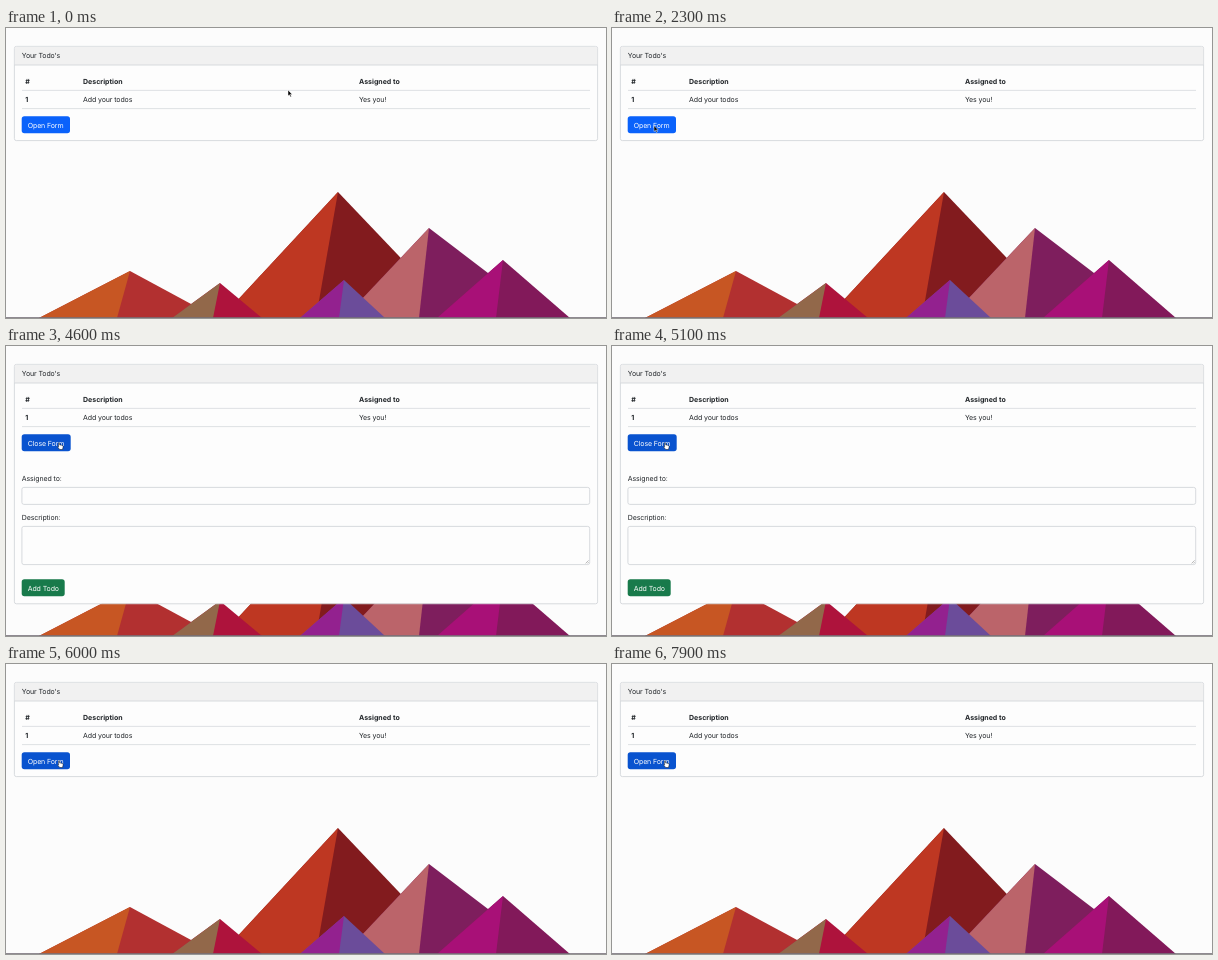
These frames come from a looping animation (600x290 px, 8 s). An HTML page:

```html
<!DOCTYPE html>
<html lang="en">
<head>
<meta charset="utf-8">
<title>Todo list</title>
<style>
  html, body { margin: 0; width: 100%; height: 100%; overflow: hidden; background: #fcfcfc; }
  svg { display: block; width: 600px; height: 290px; }
  text { font: 7px Inter, "Open Sans", sans-serif; letter-spacing: -.1px; fill: #212529; text-rendering: geometricPrecision; }
  .bold { font-weight: 700; letter-spacing: 0; }
  .light { fill: #fff; }
  .box { fill: #fdfdfd; stroke: #cfd2d6; stroke-width: .8; }
  .rule { stroke: #dcdfe2; stroke-width: .9; }
</style>
</head>
<body>
<svg viewBox="0 0 600 290">
  <g id="mountains"></g>
  <path d="M0 289.6H600" stroke="#77717a" stroke-width=".9"/>

  <rect id="card" class="box" x="8.4" y="18.4" width="583.2" rx="2"/>
  <path d="M8.8 37V20.4a1.6 1.6 0 0 1 1.6-1.6H589.6a1.6 1.6 0 0 1 1.6 1.6V37Z" fill="#f1f1f1"/>
  <path d="M8.4 37H591.6" stroke="#cfd2d6" stroke-width=".8"/>
  <text x="15.8" y="30.3">Your Todo's</text>

  <g class="bold">
    <text class="bold" x="19.3" y="55.8">#</text>
    <text class="bold" x="77" y="55.8">Description</text>
    <text class="bold" x="353" y="55.8">Assigned to</text>
    <text class="bold" x="19.3" y="74.4">1</text>
  </g>
  <text x="77" y="74.4">Add your todos</text>
  <text x="353" y="74.4">Yes you!</text>
  <path class="rule" d="M16 62.4H584M16 80.6H584"/>

  <rect id="toggle" x="15.7" y="88.3" height="17" rx="2.7"/>
  <text id="label" class="light" x="21.7" y="99.6"></text>

  <g id="form">
    <text x="15.8" y="135">Assigned to:</text>
    <rect class="box" x="15.9" y="141.4" width="567.8" height="17" rx="2"/>
    <text x="15.8" y="173.6">Description:</text>
    <rect class="box" x="15.9" y="180.4" width="567.8" height="38.2" rx="2"/>
    <path d="M579.6 217.4l3-3M581.5 217.4l1.2-1.2" stroke="#777" stroke-width=".5"/>
    <rect x="15.7" y="233.3" width="43" height="17" rx="2.7" fill="#187a4b"/>
    <text class="light" x="21.7" y="244.5">Add Todo</text>
  </g>

  <g id="cursor">
    <path id="arrow" d="M0 0V6L1.4 4.8L2.4 7L3.4 6.5L2.4 4.4H4.2Z" fill="#000" stroke="#fff" stroke-width=".5"/>
    <path id="hand" d="M.6 .5Q1.2 0 1.7 .6V2.4Q3.2 2.3 4.8 3.2Q5.4 3.6 5 5L4.5 7H1.7L-.4 4.4Q-.2 3.6 .6 4.2Z" fill="#fff" stroke="#111" stroke-width=".5"/>
  </g>
</svg>
<script>
const LOOP = 8000, STEP = 100;
const $ = id => document.getElementById(id);

// peak x, peak y, left foot, ridge foot, right foot, left colour, right colour
const mountains = [
  [332, 164, 215, 310, 452, "#be3722", "#821b1e"],
  [423, 200, 338, 413, 541, "#bb646a", "#7e1e5d"],
  [497, 232, 431, 490, 564, "#a81077", "#82195a"],
  [338, 252, 294, 333, 379, "#93218f", "#6b4c9a"],
  [124, 243, 33, 111, 211, "#c75623", "#b23030"],
  [214, 255, 166, 207, 256, "#92684a", "#ae133c"],
];
const face = (x, y, a, b, fill) => `<path d="M${x} ${y}L${a} 290H${b}Z" fill="${fill}"/>`;
$("mountains").innerHTML = mountains.map(([x, y, left, ridge, right, c1, c2]) =>
  face(x, y, left, right, c2) + face(x, y, left, ridge, c1)).join("");

// time, x, y of the pointer tip
const path = [
  [0, 282, 62], [300, 279, 68], [400, 279, 68], [600, 144.5, 97], [800, 144.5, 97],
  [1100, 58, 87], [1400, 150, 114], [1500, 150, 114], [2000, 31, 97], [2200, 31, 97],
  [2300, 42, 97.5], [2700, 43, 69.5], [2900, 43, 69.5], [3300, 49, 95.5], [3900, 49, 95.5],
  [4000, 52, 96.5], [LOOP, 52, 96.5],
];
const firstClick = 4600;
const isOpen = t => (t >= firstClick && t < 5700) || (t >= 7000 && t < 7800);

function pointer(t) {
  const i = path.findIndex(p => p[0] > t);
  const [t0, x0, y0] = path[i - 1], [t1, x1, y1] = path[i];
  const k = (t - t0) / (t1 - t0);
  return [x0 + (x1 - x0) * k, y0 + (y1 - y0) * k];
}

const show = (id, on) => $(id).setAttribute("visibility", on ? "visible" : "hidden");

function draw(now) {
  const t = Math.floor((now % LOOP) / STEP) * STEP;
  const open = isOpen(t), clicked = t >= firstClick;
  $("card").setAttribute("height", open ? 239.4 : 94.2);
  $("toggle").setAttribute("width", open ? 49 : 48.3);
  $("toggle").setAttribute("fill", clicked ? "#0953cf" : "#0a62fb");
  $("label").textContent = open ? "Close Form" : "Open Form";
  show("form", open);
  show("arrow", !clicked);
  show("hand", clicked);
  $("cursor").setAttribute("transform", `translate(${pointer(t)})`);
}

const start = performance.now();
function tick() {
  draw(performance.now() - start);
  requestAnimationFrame(tick);
}
tick();
</script>
</body>
</html>
```
